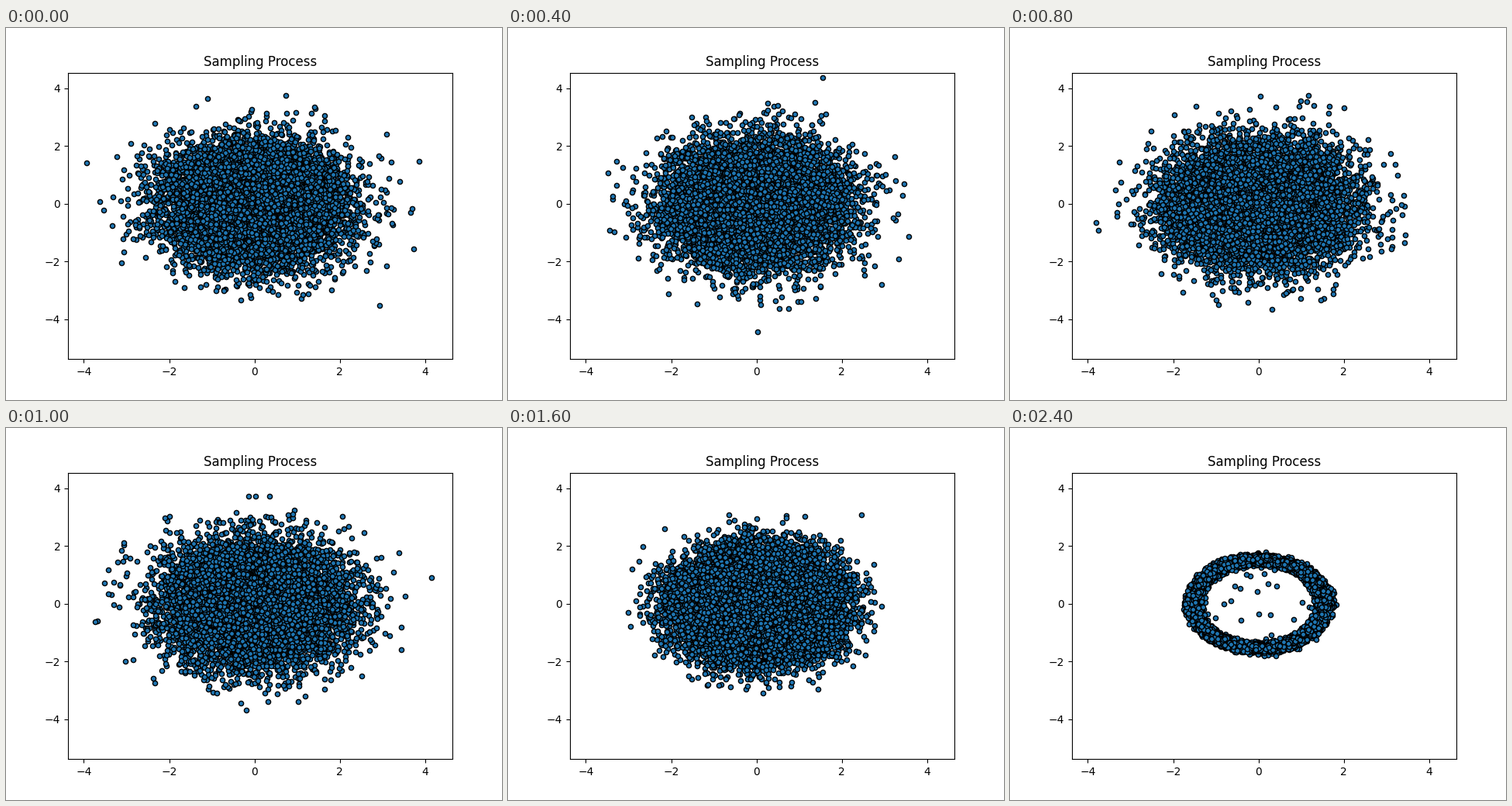
A matplotlib script that plays this animation: 640 by 480 pixels, repeating every 2600 ms.

```python
import numpy as np
import matplotlib.pyplot as plt
from matplotlib.animation import FuncAnimation

STEPS = 13
COUNT = 10000
STRAGGLERS = 18      # samples that never settle on the ring
RING_RADIUS = 1.53
RING_WIDTH = 0.085
DECAY = 3.7          # how fast the forward diffusion drowns the ring


def clean_samples(rng):
    """Points on the ring, plus a few scattered inside it."""
    radius = np.full(COUNT, RING_RADIUS)
    radius[:STRAGGLERS] = 1.2 * np.sqrt(rng.random(STRAGGLERS))
    angle = rng.uniform(0, 2 * np.pi, COUNT)
    return np.column_stack([radius * np.cos(angle), radius * np.sin(angle)])


def cloud(step):
    """Mix ring and noise: pure noise at the first step, thin ring at the last."""
    rng = np.random.default_rng(40 + step)
    time = 1 - step / (STEPS - 1)
    signal = np.exp(-DECAY * time ** 2)
    spread = np.sqrt(1 - signal + signal * RING_WIDTH ** 2)
    noise = rng.standard_normal((COUNT, 2))
    points = np.sqrt(signal) * clean_samples(rng) + spread * noise
    return rng.permutation(points)


fig, ax = plt.subplots(figsize=(6.4, 4.8), dpi=100)
ax.set_title("Sampling Process")
ax.set_xlim(-4.37, 4.637)
ax.set_ylim(-5.373, 4.536)
ax.set_xticks(range(-4, 5, 2))
ax.set_yticks(range(-4, 5, 2))
dots = ax.scatter([], [], s=20, c="#1f77b4", edgecolors="black", linewidths=1)


def update(step):
    dots.set_offsets(cloud(step))
    return (dots,)


anim = FuncAnimation(fig, update, frames=STEPS, interval=200,
                     repeat=True, repeat_delay=0)
plt.show()
```
